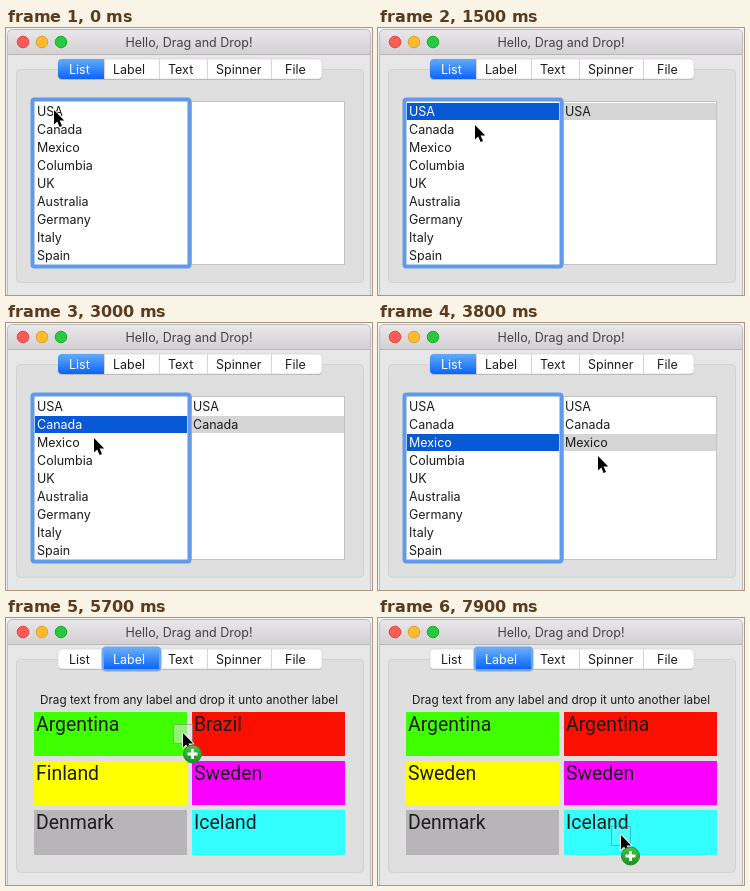
Animation, 366 px wide and 267 px high, one loop 8 s. Source, as an HTML page with a canvas:

```html
<!DOCTYPE html>
<html lang="en">
<head>
<meta charset="utf-8">
<title>Drag and Drop</title>
<style>
html, body { margin: 0; width: 100%; height: 100%; overflow: hidden; }
canvas { display: block; width: 366px; height: 267px; }
</style>
</head>
<body>
<canvas id="stage" width="366" height="267"></canvas>
<script>
const ctx = document.getElementById('stage').getContext('2d');
const LOOP = 8000, STEP = 100;
const UI = 'Inter, "Open Sans", sans-serif';
const countries = ['USA', 'Canada', 'Mexico', 'Columbia', 'UK', 'Australia', 'Germany', 'Italy', 'Spain'];
const picks = [100, 1800, 3100];    // row selected on the left
const drops = [900, 2400, 3600];    // row added on the right
const showLabels = 4600, tabFocus = 5500, dropBrazil = 6100, dropFinland = 7000;

// Pointer moves: from time, to time, x, y; it rests in between
const moves = [
  [100, 500, 212, 106], [700, 800, 222, 112], [1000, 1500, 97, 97],
  [1700, 1800, 72, 101], [1800, 2300, 226, 122], [2500, 2900, 88, 115],
  [3000, 3100, 70, 119], [3100, 3400, 234, 130], [3500, 3800, 220, 133],
  [3800, 4300, 140, 52], [4300, 4500, 127, 40], [4800, 5200, 170, 123],
  [5200, 5300, 114, 110], [5400, 6000, 240, 120], [6100, 6300, 225, 172],
  [6500, 6800, 115, 169], [7100, 7500, 168, 226], [7600, 7900, 243, 217]
];
// Start and end of each drag
const drags = [[200, 900], [1900, 2400], [3200, 3600], [5500, 6100], [6600, 7000], [7700, LOOP]];

function pointer(t) {
  let x = 48, y = 82;
  for (const [from, to, toX, toY] of moves) {
    const k = Math.min(1, Math.max(0, (t - from) / (to - from)));
    x += (toX - x) * k;
    y += (toY - y) * k;
  }
  return { x, y, drag: drags.some(([from, to]) => t >= from && t < to) };
}

function rect(x, y, w, h, fill) {
  ctx.fillStyle = fill;
  ctx.fillRect(x, y, w, h);
}

function round(x, y, w, h, r, fill, stroke, width = 1) {
  ctx.beginPath();
  ctx.roundRect(x, y, w, h, r);
  if (fill) { ctx.fillStyle = fill; ctx.fill(); }
  if (stroke) { ctx.strokeStyle = stroke; ctx.lineWidth = width; ctx.stroke(); }
}

function disc(x, y, r, fill, stroke) {
  round(x - r, y - r, 2 * r, 2 * r, r, fill, stroke);
}

function text(s, x, y, color = '#1c1c1c', font = '12.5px ' + UI, align = 'left') {
  ctx.font = font;
  ctx.fillStyle = color;
  ctx.textAlign = align;
  ctx.fillText(s, x, y);
}

function vertical(y0, y1, top, bottom) {
  const g = ctx.createLinearGradient(0, y0, 0, y1);
  g.addColorStop(0, top);
  g.addColorStop(1, bottom);
  return g;
}

function drawWindow() {
  rect(0, 0, 366, 267, '#f1f1f1');
  round(1.5, 1.5, 363, 275, 5, '#e8e7e8', '#bdbcbd');
  round(2, 2, 362, 25, [5, 5, 0, 0], vertical(2, 27, '#e9e7e9', '#d2d0d2'));
  rect(2, 26, 362, 1, '#b9b7b9');
  disc(17, 14, 5.8, '#fc5b57', '#e2463f');
  disc(36, 14, 5.8, '#fdbc2e', '#e0a028');
  disc(55, 14, 5.8, '#28c840', '#1dac2c');
  text('Hello, Drag and Drop!', 183, 19, '#444', '12.5px ' + UI, 'center');
  round(10.5, 41.5, 347, 213, 4, '#e0dfe0', '#d3d2d3');
}

function drawTabs(active, focused) {
  const edges = [52, 98, 153, 201, 265, 316];
  const starts = [63, 107, 162, 210, 279];
  round(52, 32, 264, 20, 4, '#b5b4b5');
  round(52, 31, 264, 20, 4, '#fff', '#cfcecf', .6);
  for (const x of edges.slice(1, -1)) rect(x, 31, 1, 20, '#d4d4d4');
  const x = edges[active], w = edges[active + 1] - x;
  if (focused) round(x - 1, 30, w + 2, 22, 3, null, '#75a7ee', 3);
  round(x, 31, w, 20, active ? 0 : [4, 0, 0, 4], vertical(31, 51, '#62abfa', '#0b64fb'));
  ['List', 'Label', 'Text', 'Spinner', 'File'].forEach((s, i) =>
    text(s, starts[i], 46, i === active ? '#fff' : '#1c1c1c'));
}

function drawLists(t) {
  const selected = picks.filter(p => p <= t).length - 1;
  const added = drops.filter(d => d <= t).length;
  rect(185, 73, 154, 164, '#c3c2c3');
  rect(186, 74, 152, 162, '#fff');
  round(26.5, 71.5, 157, 167, 2, '#fff', '#629ae9', 4);
  countries.forEach((name, i) => {
    const y = 75 + 18 * i;
    if (i === selected) rect(29, y, 152, 17, '#0759d6');
    text(name, 31, y + 13, i === selected ? '#fff' : '#1c1c1c');
    if (i < added) {
      if (i === added - 1) rect(186, y, 152, 17, '#d6d5d6');
      text(name, 187, y + 13);
    }
  });
}

function drawLabels(t) {
  text('Drag text from any label and drop it unto another label', 183, 86, '#1c1c1c', '11.7px ' + UI, 'center');
  const cells = [
    ['Argentina', '#40ff00'], [t < dropBrazil ? 'Brazil' : 'Argentina', '#fb0f00'],
    [t < dropFinland ? 'Finland' : 'Sweden', '#ffff00'], ['Sweden', '#f900ff'],
    ['Denmark', '#b7b5b7'], ['Iceland', '#33ffff']
  ];
  cells.forEach(([name, color], i) => {
    const x = i % 2 ? 186 : 28, y = 94 + 49 * (i >> 1);
    rect(x, y, 153, i > 3 ? 45 : 44, color);
    text(name, x + 2, y + 19, '#1c1c1c', '19.4px Roboto, Inter, sans-serif');
  });
}

function drawPointer({ x, y, drag }, canDrop, ghost) {
  ctx.save();
  ctx.translate(Math.round(x), Math.round(y));
  if (drag) {
    rect(-10, -9, 20, 20, `rgba(228,228,236,${ghost})`);
    ctx.setLineDash([1, 1]);
    ctx.lineWidth = 1;
    ctx.strokeStyle = 'rgba(60,60,60,.65)';
    ctx.strokeRect(-9.5, -8.5, 19, 19);
    ctx.setLineDash([]);
  }
  const arrow = new Path2D('M0 0V14.5L3.2 11.5L5.6 17L8 16L5.6 10.6H10.2Z');
  ctx.lineJoin = 'round';
  ctx.lineWidth = 1.8;
  ctx.strokeStyle = '#fff';
  ctx.stroke(arrow);
  ctx.fillStyle = '#000';
  ctx.fill(arrow);
  if (drag && canDrop) {
    disc(9.5, 21, 9, vertical(12, 30, '#4fc04a', '#14941c'), '#2b8a2b');
    rect(4.5, 19.5, 10, 3, '#fff');
    rect(8, 16, 3, 10, '#fff');
  }
  ctx.restore();
}

function draw(now) {
  const t = Math.floor(now % LOOP / STEP) * STEP;
  const labels = t >= showLabels;
  const p = pointer(t);
  drawWindow();
  drawTabs(labels ? 1 : 0, t >= tabFocus);
  if (labels) drawLabels(t); else drawLists(t);
  drawPointer(p, labels || p.x > 185, t < dropFinland ? .5 : .1);
}

const start = performance.now();
function tick() {
  draw(performance.now() - start);
  requestAnimationFrame(tick);
}
tick();
</script>
</body>
</html>
```
